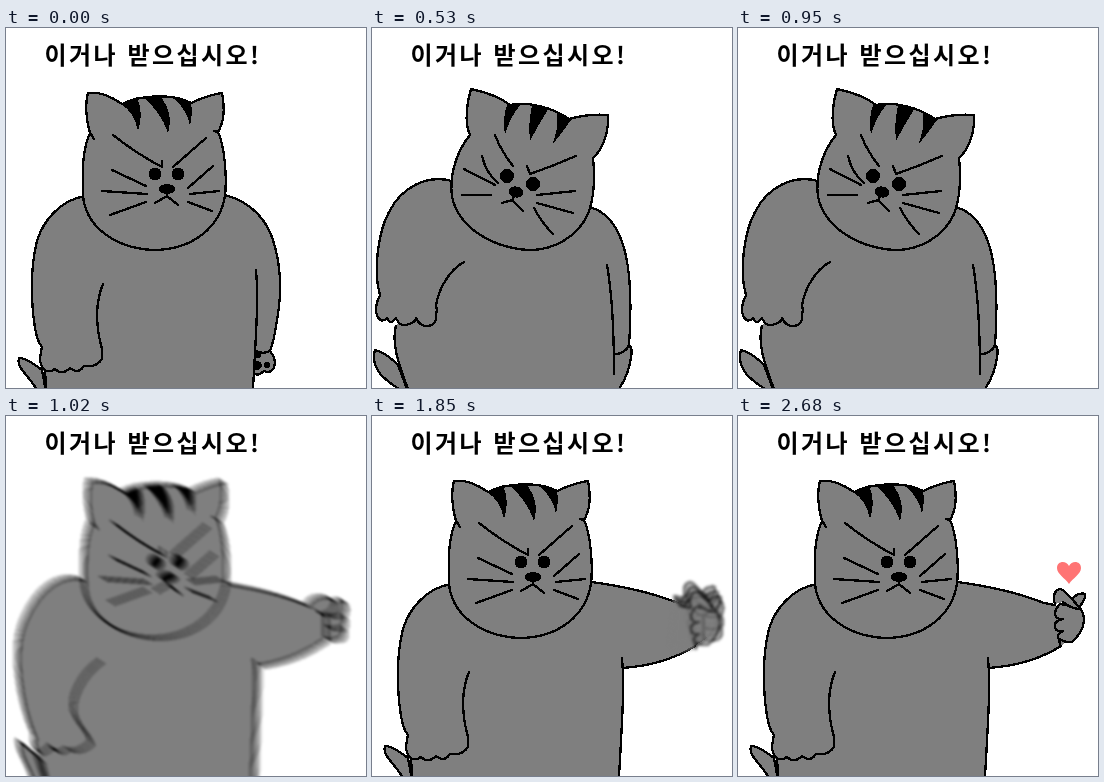
These frames come from a looping animation (360 by 360 pixels, 3.18 s). An HTML page:

```html
<!DOCTYPE html>
<html lang="ko">
<head>
<meta charset="utf-8">
<title>이거나 받으십시오!</title>
<style>
html, body { margin: 0; width: 100%; height: 100%; overflow: hidden; background: #fff; }
svg { display: block; width: 100vw; height: 100vh; }
path, ellipse, circle, g { stroke-linecap: round; stroke-linejoin: round; }
.art { fill: #7f7f7f; stroke: #000; stroke-width: 2.3; shape-rendering: crispEdges; }
.fill { stroke: none; }
.line { fill: none; }
.ink { fill: #000; stroke: none; }
text { font: 700 24px "Noto Sans CJK KR", "Noto Sans CJK", "Noto Sans CJK JP", sans-serif; letter-spacing: 2.4px; fill: #000; }

.scene { visibility: hidden; animation: 3180ms step-end infinite; }
#stand { animation-name: stand; }
#rest { animation-name: rest; }
#whirl { animation-name: whirl; }
#crouch { animation-name: crouch; }
#wide { animation-name: wide; }
#slim { animation-name: slim; }
#swing { animation-name: swing; }
#reach { animation-name: reach; }
#punch { animation-name: punch; }
#twist { animation-name: twist; }
#sign { animation-name: sign; }
#heart { animation-name: heart; }

@keyframes stand { 0%, 33.018% { visibility: visible } 15.723% { visibility: hidden } 100% { visibility: visible } }
@keyframes rest { 0% { visibility: visible } 15.723%, 100% { visibility: hidden } }
@keyframes whirl { 0%, 16.666%, 100% { visibility: hidden } 15.723% { visibility: visible } }
@keyframes crouch { 0%, 32.075%, 100% { visibility: hidden } 16.666% { visibility: visible } }
@keyframes slim {
  0%, 18.867%, 23.270%, 27.672%, 32.075%, 100% { visibility: hidden }
  16.666%, 21.069%, 25.471%, 29.874% { visibility: visible }
}
@keyframes wide {
  0%, 21.069%, 25.471%, 29.874%, 100% { visibility: hidden }
  18.867%, 23.270%, 27.672% { visibility: visible }
}
@keyframes swing { 0%, 33.018%, 100% { visibility: hidden } 32.075% { visibility: visible } }
@keyframes reach { 0% { visibility: hidden } 33.018%, 100% { visibility: visible } }
@keyframes punch { 0%, 58.176%, 100% { visibility: hidden } 33.018% { visibility: visible } }
@keyframes twist { 0%, 59.119%, 100% { visibility: hidden } 58.176% { visibility: visible } }
@keyframes sign { 0% { visibility: hidden } 59.119%, 100% { visibility: visible } }
@keyframes heart {
  0% { visibility: hidden; transform: none }
  74.842% { visibility: visible; transform: none }
  76.415%, 82.704% { visibility: visible; transform: translateY(-3px) }
  77.987%, 81.132% { visibility: visible; transform: translateY(-6px) }
  79.559% { visibility: visible; transform: translateY(-9px) }
  84.276%, 100% { visibility: visible; transform: none }
}
</style>
</head>
<body>
<svg viewBox="0 0 360 360">
<defs>
  <g id="head">
    <path d="M116 76C133 67 168 65 185 75C198 69 208 66 216 65C219 80 218 94 212 104C219 119 221 150 219 168C214 199 187 222 147 222C107 220 79 197 77 167C76 140 77 120 84 105C80 92 79 76 82 65C95 63 106 69 116 76Z"/>
    <path class="line" d="M83 103L88 111M212 104L208 103"/>
    <path class="ink" d="M115 76L131 69Q138 86 132 103Q128 84 115 76ZM137 69L154 68Q168 85 162 105Q155 84 137 69ZM168 70L185 75Q187 86 184 97Q180 81 168 70Z"/>
    <path class="line" d="M107 107Q131 126 156 139V133M167 139L200 110"/>
    <circle class="ink" cx="149" cy="146" r="6.5"/>
    <circle class="ink" cx="172" cy="146" r="6.5"/>
    <ellipse class="ink" cx="161" cy="161" rx="8.5" ry="4.8"/>
    <path class="line" d="M161 165V168M149 175L161 168L172 177"/>
    <path class="line" d="M106 142L140 158M96 163L141 166M104 187L140 174M207 138L182 160M184 166L213 163M182 174L206 183"/>
  </g>

  <g id="tail"><path d="M43 380L36 342C28 336 20 330 13 330C10 340 22 346 31 362L36 380"/></g>

  <g id="mid">
    <path class="fill" d="M80 164L220 168L255 242L250 380H30L24 345L40 330Z"/>
    <path d="M44 380L36 345C28 338 20 330 13 325C12 337 20 345 26 362L30 380"/>
    <path d="M79 164C53 155 31 174 19 202C4 232 14 288 28 320Q26 332 34 337Q40 336 45 330Q52 340 61 333Q74 338 85 327C84 318 72 310 68 297C64 282 76 258 95 245"/>
    <path class="line" d="M30 338L44 380"/>
  </g>

  <g id="arm">
    <path class="fill" d="M219 166C260 171 293 180 313 190L335 222C310 239 285 249 250 252L230 230Z"/>
    <path class="line" d="M219 166C250 170 281 177 306 187M250 252C281 250 304 242 323 230"/>
  </g>

  <g id="fist">
    <path class="fill" d="M305 187L316 186L332 198L331 224L323 230L300 235Z"/>
    <path class="line" d="M306 187L313 190M323 230L331 225"/>
    <path d="M331 198V222Q335 226 346 223Q351 220 349 211Q352 206 349 199Q353 191 349 185Q343 182 339 186Q335 192 331 198Z"/>
    <path class="line" d="M331 199Q340 202 349 199M331 211Q340 214 349 211"/>
    <path d="M313 190C313 180 333 177 339 186C341 193 336 197 331 198Q325 200 323 195"/>
  </g>

  <g id="hand">
    <path class="fill" d="M305 187L317 188L324 208L322 230L300 235Z"/>
    <path class="line" d="M306 187L317 189M322 230L321 222"/>
    <path d="M335 182Q341 176 347 178Q348 184 340 192L334 188Z"/>
    <path d="M322 188Q315 195 318 201Q322 204 325 203Q315 205 317 212Q320 217 325 215Q317 219 321 223Q327 227 334 226Q345 216 346 205Q346 197 342 192Z"/>
    <path d="M317 188C314 180 317 174 322 173C328 174 333 183 343 193Q333 193 325 186"/>
  </g>

  <g id="turn">
    <path d="M220 166C247 176 264 200 268 238C271 275 265 302 261 320Q263 335 260 350L255 380L230 290"/>
    <use href="#mid"/>
    <path class="line" d="M251 238C255 275 253 300 249 325L247 380"/>
    <use href="#head" x="1"/>
  </g>

  <g id="throw">
    <g transform="translate(-11 0)"><use href="#arm"/><use href="#fist"/></g>
    <use href="#mid"/>
    <path class="line" d="M250 245C252 280 249 320 247 380"/>
    <use href="#head" x="1"/>
  </g>
</defs>

<rect width="360" height="360" fill="#fff"/>

<g class="art">
  <g id="rest" class="scene">
    <path d="M219 167C246 174 261 193 267 212C276 240 275 270 271 292C269 306 267 316 264 323Q271 331 268 340Q264 346 258 343Q252 349 247 345L235 300"/>
    <path class="line" d="M249 322Q256 327 264 323"/>
    <path class="ink" d="M248 334Q255 331 256 338Q253 344 248 342Z"/>
    <circle class="ink" cx="252" cy="327" r="3"/>
    <circle class="ink" cx="261" cy="337" r="3"/>
  </g>
  <g id="reach" class="scene"><use href="#arm"/></g>
  <g id="punch" class="scene"><use href="#fist"/></g>
  <g id="sign" class="scene"><use href="#hand"/></g>

  <g id="stand" class="scene">
    <use href="#tail"/>
    <path class="fill" d="M79 168L219 167L250 242L251 270L246 380H42L36 330Z"/>
    <path d="M79 168C54 172 37 193 31 213C24 240 25 275 29 300Q31 313 36 319Q33 331 35 337Q40 347 49 341Q56 348 64 340Q72 347 78 338Q90 340 96 331Q97 322 94 313C89 290 90 273 97 256"/>
    <path class="line" d="M39 344L42 380M250 242C253 275 249 320 246 380"/>
    <use href="#head"/>
  </g>

  <g id="wide" class="scene">
    <path d="M220 178C241 180 252 198 257 214C264 240 263 282 257 320Q258 343 246 361L238 380L215 300"/>
    <path class="line" d="M243 327Q252 325 257 317"/>
  </g>
  <g id="slim" class="scene">
    <path d="M217 179C236 183 247 202 252 220C260 248 259 288 257 317Q261 320 259 329Q257 346 247 361L238 380L215 300"/>
    <path class="line" d="M243 326Q253 326 257 317"/>
  </g>

  <g id="crouch" class="scene">
    <path d="M42 380L26 337Q13 324 3 322Q-1 334 9 347Q17 355 27 361L36 380"/>
    <path class="fill" d="M80 153L217 179L235 237Q242 275 242 325L238 380H42L24 330L22 298L60 280Z"/>
    <path d="M80 153C54 146 29 160 17 184C6 204 1 244 8 267Q2 279 5 288Q10 296 15 290Q18 298 24 290Q28 300 37 296Q43 295 44 290Q49 301 60 297Q65 294 64 286Q66 282 64 278C66 262 77 242 92 234"/>
    <path class="line" d="M24 298C19 315 27 337 36 361M235 237C240 265 242 300 242 346"/>
    <path d="M138 77C158 73 181 80 197 91C211 87 224 86 236 87C237 104 231 121 221 130C223 149 222 170 216 186C206 208 182 223 155 222C118 219 87 199 80 169C77 146 85 123 98 107C92 94 95 74 99 61C113 64 128 69 138 77Z"/>
    <path class="ink" d="M135 77H148Q137 91 133 107Q130 91 135 77ZM160 77L177 80Q166 97 158 113Q156 96 160 77ZM185 84L199 92Q191 104 180 117Q187 101 185 84Z"/>
    <path class="line" d="M123 107Q129 123 141 138M155 138L158 146Q181 138 204 128"/>
    <circle class="ink" cx="135" cy="148" r="7"/>
    <circle class="ink" cx="161" cy="156" r="7"/>
    <ellipse class="ink" cx="144" cy="164" rx="7.5" ry="5.5" transform="rotate(10 144 164)"/>
    <path class="line" d="M142 168L140 173M130 175L140 172L151 183"/>
    <path class="line" d="M110 128Q114 145 126 155M92 141L123 157M90 167H119M165 167L203 163M165 175L201 185M162 180Q170 195 181 206"/>
  </g>

  <g id="whirl" class="scene" style="filter: blur(.9px)"></g>
  <g id="swing" class="scene" style="filter: blur(.9px)"></g>
  <g id="twist" class="scene" style="filter: blur(1.8px)"></g>
</g>

<path id="heart" class="scene" fill="#ff7474" d="M331 168C327 162 319 158 319 152C319 145 328 144 331 150C334 144 343 145 343 152C343 158 335 162 331 168Z"/>

<text x="38.5" y="35.5">이거나</text>
<text x="121.5" y="35.5">받으십시오!</text>
</svg>
<script>
const NS = 'http://www.w3.org/2000/svg';

function add(parent, tag, attrs) {
  const el = document.createElementNS(NS, tag);
  for (const k in attrs) el.setAttribute(k, attrs[k]);
  return parent.appendChild(el);
}

// Average opaque copies along a down-right line into one motion smear.
function smear(id, shape, count = 11, step = 0.9) {
  const box = document.getElementById(id);
  for (let i = 0; i < count; i++) {
    const d = (i - (count - 1) / 2) * step;
    const layer = add(box, 'g', { opacity: 1 / (i + 1) });
    add(layer, 'rect', { x: -20, y: -20, width: 400, height: 400, fill: '#fff', stroke: 'none' });
    add(layer, 'use', { href: shape, transform: `translate(${d} ${d * 0.65})` });
  }
}

smear('whirl', '#turn');
smear('swing', '#throw');

const twist = document.getElementById('twist');
for (let i = 0; i < 5; i++) {
  const d = (i - 2) * 2.5;
  add(twist, 'use', {
    href: i % 2 ? '#fist' : '#hand',
    opacity: 0.6,
    transform: `translate(${d * 0.6 - 1} ${d - 2})`
  });
}
</script>
</body>
</html>
```
